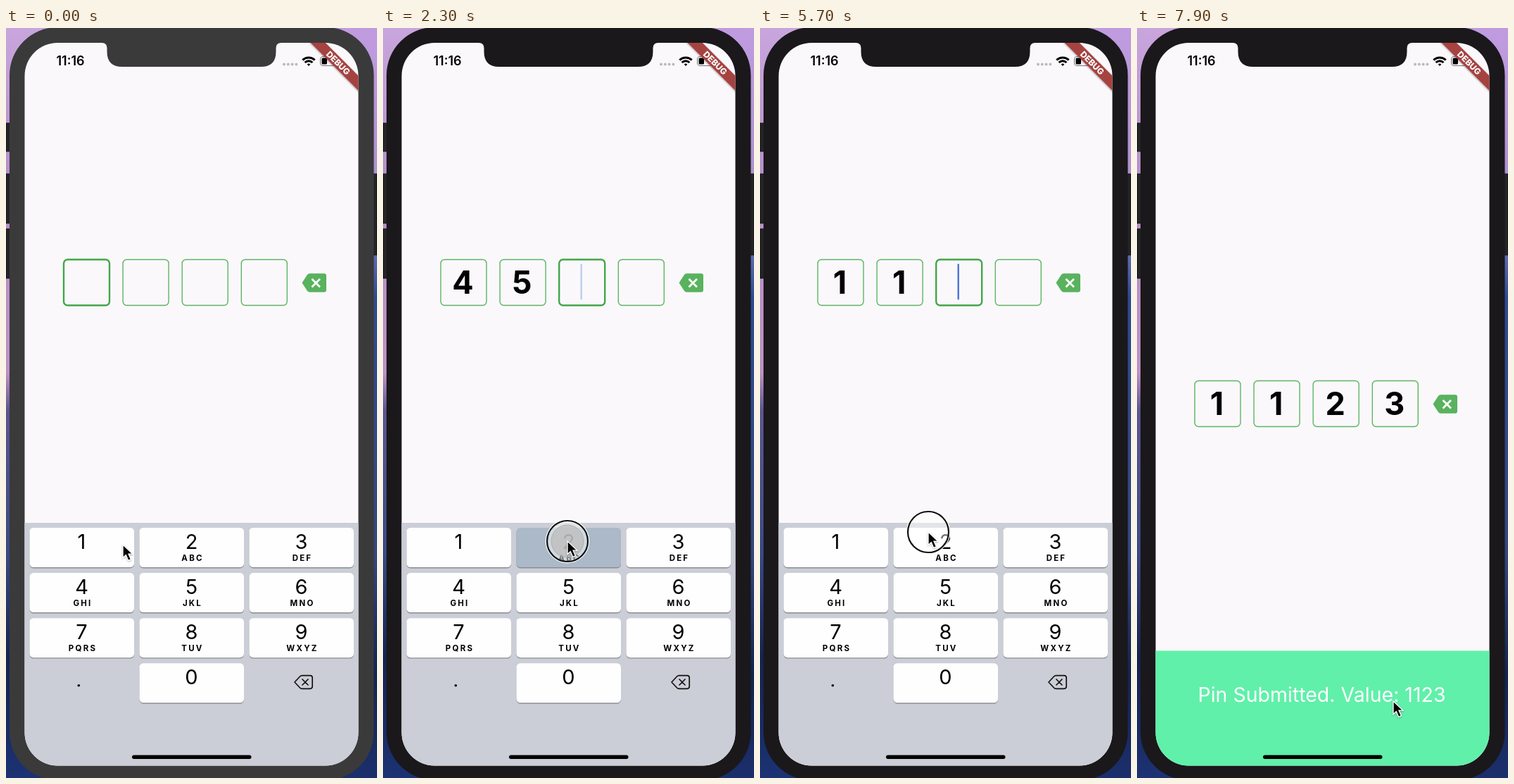
These frames come from a looping animation (527x1064 px, 8000 ms). An HTML page:

```html
<!DOCTYPE html>
<html lang="en">
<head>
<meta charset="utf-8">
<title>Pin entry</title>
<style>
  html, body { margin: 0; height: 100%; overflow: hidden; }
  svg { display: block; font-family: Inter, sans-serif; }
  text { text-anchor: middle; }
  .digit { font-size: 29px; }
  .letters { font-size: 11.5px; font-weight: 700; letter-spacing: 2.2px; }
  .pin { font-size: 45px; font-weight: 700; }
</style>
</head>
<body>
<svg width="527" height="1064" viewBox="0 0 527 1064">
  <defs>
    <linearGradient id="wallLeft" x2="0" y2="1">
      <stop offset="0" stop-color="#c9a5dd"/><stop offset=".2" stop-color="#b58fc9"/>
      <stop offset=".46" stop-color="#bd91c4"/><stop offset=".51" stop-color="#5d5690"/>
      <stop offset=".7" stop-color="#3a4a84"/><stop offset=".84" stop-color="#14234f"/>
      <stop offset="1" stop-color="#1c3273"/>
    </linearGradient>
    <linearGradient id="wallRight" x2="0" y2="1">
      <stop offset="0" stop-color="#c09be0"/><stop offset=".19" stop-color="#b092d2"/>
      <stop offset=".31" stop-color="#5a67ad"/><stop offset=".36" stop-color="#2f4a92"/>
      <stop offset=".7" stop-color="#34477f"/><stop offset=".86" stop-color="#14234f"/>
      <stop offset="1" stop-color="#1b2f6c"/>
    </linearGradient>
    <clipPath id="screen"><rect x="26.5" y="21" width="474" height="1025.5" rx="47"/></clipPath>
    <filter id="soft" x="-50%" y="-50%" width="200%" height="200%">
      <feDropShadow dx="0" dy="1" stdDeviation="1.2" flood-opacity=".35"/>
    </filter>
  </defs>

  <rect width="264" height="1064" fill="url(#wallLeft)"/>
  <rect x="264" width="263" height="1064" fill="url(#wallRight)"/>
  <path d="M0 135h6v40h-6zM0 207h6v70h-6zM0 285h6v70h-6zM521 207h6v115h-6z" fill="#242326" stroke="#111"/>
  <rect class="bezel" x="5" y="-1" width="517.5" height="1068" rx="68"/>

  <g clip-path="url(#screen)">
    <rect x="26" y="21" width="475" height="1026" fill="#faf8fb"/>
    <g id="form">
      <g id="boxes"></g>
      <rect id="caret" y="334.5" width="2.4" height="51" rx="1" fill="#4a72d6"/>
      <path d="M420.500 361.500l7.500-11.500q1.200-1.700 3.400-1.700h20.600q3 0 3 3v20.500q0 3-3 3h-20.600q-2.200 0-3.400-1.700z" fill="#59b25e"/>
      <path d="M434.500 356l11.500 11.500M446 356l-11.500 11.500" stroke="#fff" stroke-width="2.8"/>
    </g>
    <g id="snack">
      <rect x="26" y="883.500" width="475" height="164" fill="#60f0aa"/>
      <text x="262.500" y="956" font-size="28.500" fill="#fff">Pin Submitted. Value: 1123</text>
    </g>
    <g id="keyboard">
      <rect x="26" y="702" width="475" height="345" fill="#cbced6"/>
      <g id="keys"></g>
      <circle cx="103.300" cy="932.800" r="1.800"/>
      <path d="M410 928l7.500-8q1.300-1.300 3-1.300h11.500q3.200 0 3.200 3.200v12.200q0 3.200-3.200 3.200h-11.500q-1.700 0-3-1.300zM421 924l8 8M429 924l-8 8" fill="none" stroke="#111" stroke-width="1.700" stroke-linejoin="round" stroke-linecap="round"/>
    </g>
    <rect x="179" y="1031.500" width="169.500" height="5.500" rx="2.750"/>

    <text x="91.500" y="53.300" font-size="18" font-weight="600">11:16</text>
    <path d="M395 51.500h18" stroke="#bbb9bc" stroke-width="4" stroke-linecap="round" stroke-dasharray="0 5.800"/>
    <g fill="none" stroke="#000" stroke-width="3">
      <path d="M421.300 45.500a12.500 12.500 0 0 1 17.400 0M424.600 49a7.700 7.700 0 0 1 10.800 0"/>
      <path d="M430 54l-2.300-2.500a3.300 3.300 0 0 1 4.600 0z" fill="#000" stroke="none"/>
    </g>
    <rect x="446.500" y="40.500" width="21" height="13" rx="3.500" fill="none" stroke="#777"/>
    <rect x="448.500" y="42.500" width="7.500" height="9" rx="1.500"/>
    <g transform="translate(500.500 21) rotate(45)">
      <rect x="-60" y="33" width="120" height="15" fill="#a43f3d" fill-opacity=".96" filter="url(#soft)"/>
      <text y="44.800" font-size="12" font-weight="800" fill="#fff">DEBUG</text>
    </g>
  </g>
  <path class="bezel" d="M136 20v1q7.500 0 7.500 7.500v5q0 21.500 21.500 21.500h197q21.500 0 21.500-21.500v-5q0-7.500 7.500-7.500v-1z"/>

  <g id="pointer">
    <g id="ring">
      <circle r="30.500" fill="none" stroke="#fff" stroke-width="1.500"/>
      <circle r="29" fill="#fff" fill-opacity=".45" stroke="#111" stroke-width="2.200"/>
      <circle id="disc" r="23" fill="#bcbcbc" fill-opacity=".75" stroke="#999" stroke-opacity=".6"/>
    </g>
    <path d="M0 0v18.500l4.300-4 3.400 7.900 3.700-1.600-3.400-7.700h5.800z" stroke="#fff" stroke-width="1.300" filter="url(#soft)"/>
  </g>
</svg>
<script>
const LOOP = 8000, COMMIT = 280;
const $ = id => document.getElementById(id);

function add(parent, tag, attrs, content = '') {
  const el = document.createElementNS('http://www.w3.org/2000/svg', tag);
  for (const name in attrs) el.setAttribute(name, attrs[name]);
  el.textContent = content;
  return parent.appendChild(el);
}

const boxes = [0, 1, 2, 3].map(i => {
  const x = 82 + 84.1 * i;
  return {
    frame: add($('boxes'), 'rect', { x, y: 328.5, width: 65, height: 65, rx: 5.5, fill: 'none' }),
    label: add($('boxes'), 'text', { x: x + 31.5, y: 376.5, class: 'pin' })
  };
});

const keys = {};
['', 'ABC', 'DEF', 'GHI', 'JKL', 'MNO', 'PQRS', 'TUV', 'WXYZ', ''].forEach((letters, i) => {
  const digit = (i + 1) % 10;
  const x = 33.5 + 156 * (digit ? i % 3 : 1);
  const y = 709 + 64.1 * Math.floor(i / 3);
  const shape = { x, y, width: 148.5, height: 56, rx: 5.5 };
  add($('keys'), 'rect', { ...shape, y: y + 1.4, fill: '#8b8d92' });
  keys[digit] = add($('keys'), 'rect', shape);
  add($('keys'), 'text', { x: x + 74, y: y + (digit ? 30 : 29.5) , class: 'digit' }, digit);
  add($('keys'), 'text', { x: x + 75.5, y: y + 46.5, class: 'letters' }, letters);
});

// [press time, key]; '<' removes the last digit
const presses = [
  [560, 4], [1500, 5], [2250, 2], [3430, '<'], [3730, '<'], [4050, '<'],
  [4680, 1], [5060, 1], [5480, 2], [6240, 3]
];

// [time, x, y] of the pointer tip
const path = [
  [0, 166, 733], [150, 166, 733], [520, 112, 794], [880, 112, 794], [1350, 259, 795],
  [1750, 259, 795], [2200, 262, 728], [2500, 262, 728], [3150, 458, 358], [3300, 458, 358],
  [3420, 441, 361], [4250, 441, 361], [4660, 116, 721.5], [5250, 116, 721.5],
  [5470, 239, 715], [5780, 239, 715], [6180, 392, 712], [6650, 392, 712],
  [7400, 364, 955], [8000, 364, 955]
];

const progress = (t, from, to) => Math.min(1, Math.max(0, (t - from) / (to - from)));
const smooth = p => p * p * (3 - 2 * p);
const shift = (id, y) => $(id).setAttribute('transform', `translate(0 ${y})`);

function drawForm(t) {
  let pin = '', changed = -600;
  for (const [time, key] of presses) {
    if (t < time + COMMIT) break;
    pin = key === '<' ? pin.slice(0, -1) : pin + key;
    changed = time + COMMIT;
  }
  boxes.forEach(({ frame, label }, i) => {
    const focused = i === pin.length;
    frame.setAttribute('stroke', focused ? '#43a64a' : '#5cb561');
    frame.setAttribute('stroke-width', focused ? 2.4 : 1.4);
    label.textContent = pin[i] || '';
  });
  const phase = (t - changed) % 1000;
  $('caret').setAttribute('x', 112.3 + 84.1 * pin.length);
  $('caret').setAttribute('opacity', pin.length < 4 ? 1 - progress(phase, 480, 540) : 0);
  shift('form', t < 6600 ? 0 : 172);
}

function drawPointer(t) {
  const i = path.findIndex(p => p[0] > t);
  const [t0, x0, y0] = path[i - 1], [t1, x1, y1] = path[i];
  const p = smooth(progress(t, t0, t1));
  $('pointer').setAttribute('transform', `translate(${x0 + (x1 - x0) * p} ${y0 + (y1 - y0) * p})`);

  const press = presses.find(([time]) => t >= time && t < time + 250);
  const held = press && t < press[0] + 160;
  $('ring').setAttribute('visibility', press ? 'visible' : 'hidden');
  $('disc').setAttribute('opacity', held ? 1 : 0);
  for (const digit in keys)
    keys[digit].setAttribute('fill', held && press[1] == digit ? '#abb9c8' : '#fefefe');
}

function draw(t) {
  const bezel = t < 600 ? '#3a3a3b' : '#1a181b';
  document.querySelectorAll('.bezel').forEach(el => el.setAttribute('fill', bezel));
  drawForm(t);
  drawPointer(t);
  shift('keyboard', 346 * smooth(progress(t, 6440, 6840)));
  shift('snack', 164 * (1 - smooth(progress(t, 6600, 6850))));
}

let start;
function tick(now) {
  start ??= now;
  draw((now - start) % LOOP);
  requestAnimationFrame(tick);
}
draw(0);
requestAnimationFrame(tick);
</script>
</body>
</html>
```
